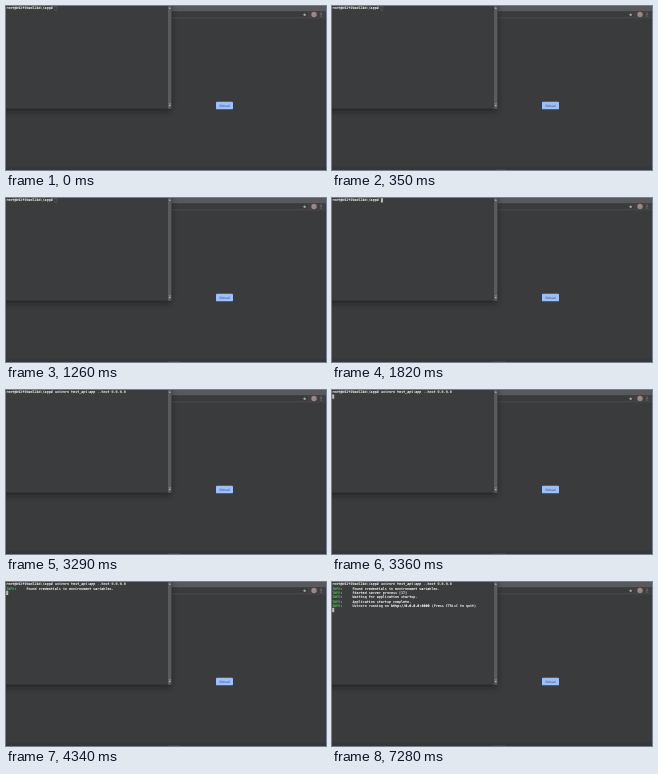
Recreate the animation shown at these times as an HTML page. Size 320x164 px, loop 8 s.

```html
<!DOCTYPE html>
<html lang="en">
<head>
<meta charset="utf-8">
<title>Server start</title>
<style>
  html, body { margin: 0; width: 100%; height: 100%; overflow: hidden; background: #3a3b3d; }
  svg { display: block; width: 100vw; height: 100vh; }
  .term text {
    font: 3.37px "DejaVu Sans Mono", "Liberation Mono", monospace;
    fill: #f4f4f4; stroke: #f4f4f4; stroke-width: .12;
    white-space: pre; text-rendering: geometricPrecision;
  }
  .term .tag { fill: #4cc24c; stroke: #4cc24c; }
  .term .strong { font-weight: bold; fill: #fff; }
  .label { font: 3.3px Roboto, Arial, sans-serif; fill: #3d4f74; text-rendering: geometricPrecision; }
</style>
</head>
<body>
<svg viewBox="0 0 320 164" preserveAspectRatio="none">
  <defs>
    <filter id="blur" x="-10%" y="-10%" width="120%" height="130%"><feGaussianBlur stdDeviation="3.4"/></filter>
  </defs>

  <!-- browser window -->
  <rect width="320" height="164" fill="#3a3b3d"/>
  <rect width="320" height="5.3" fill="#58595b"/>
  <rect y="5.3" width="320" height="6.5" fill="#3f4042"/>
  <rect x="120" y="6" width="182" height="5" rx="2.5" fill="#3a3b3d"/>
  <rect y="11.6" width="320" height=".7" fill="#4c4d4f"/>
  <path d="M298.7 7l.5 1.1 1.2.2-.9.8.2 1.2-1-.6-1.1.6.2-1.2-.9-.8 1.2-.2z" fill="#a0a1a3"/>
  <circle cx="308" cy="8.5" r="2.7" fill="#a08680"/>
  <g fill="#98999b">
    <circle cx="315" cy="6.9" r=".5"/><circle cx="315" cy="8.5" r=".5"/><circle cx="315" cy="10.1" r=".5"/>
  </g>
  <rect y="160.6" width="320" height="3.4" fill="#363739"/>
  <rect id="dock" x="161" y="163" width="13" height="1" fill="#434446"/>
  <rect x="210" y="95.7" width="17" height="7.6" rx=".9" fill="#9dc0fa"/>
  <text class="label" x="218.5" y="100.7" text-anchor="middle">Reload</text>

  <!-- terminal window -->
  <rect x="-12" y="-8" width="177" height="113" fill="#000" opacity=".42" filter="url(#blur)"/>
  <rect width="165.4" height="102.6" fill="#3b3c3e"/>
  <rect x="162" width="3.4" height="102.6" fill="#5a5b5d"/>
  <path d="M162.8 2.8l1-1.6 1 1.6zM162.8 99l1 1.6 1-1.6z" fill="#c4c5c6"/>
  <rect x="162.6" y="97.5" width="2.4" height=".8" fill="#929395"/>
  <g class="term">
    <g id="lines"></g>
    <rect id="cursor" width="2" height="4.3"/>
  </g>
</svg>
<script>
  const LOOP = 8000, CHAR = 2.03, ROW = 4.28;
  const FOCUS = 1820, PASTE = 2520, ENTER = 3290, NEWLINE = 3360, FOUND = 4340, READY = 7280;
  const prompt = "root@b92f99ad124d:/app# ";
  const command = "uvicorn test_api:app --host 0.0.0.0";
  const find = id => document.getElementById(id);
  const cursor = find("cursor"), dock = find("dock");

  function addText(row, col, str, cls = "") {
    const el = document.createElementNS("http://www.w3.org/2000/svg", "text");
    el.setAttribute("x", col * CHAR + 0.2);
    el.setAttribute("y", row * ROW + 3.4);
    el.setAttribute("class", cls);
    el.textContent = str;
    find("lines").append(el);
    return el;
  }

  const parts = [];
  const add = (from, ...args) => parts.push({ from, el: addText(...args) });

  function addInfo(from, row, message) {
    add(from, row, 0, "INFO", "tag");
    add(from, row, 4, ":");
    add(from, row, 10, message);
  }

  add(0, 0, 0, prompt);
  add(PASTE, 0, prompt.length, command);
  addInfo(FOUND, 1, "Found credentials in environment variables.");
  addInfo(READY, 2, "Started server process [17]");
  addInfo(READY, 3, "Waiting for application startup.");
  addInfo(READY, 4, "Application startup complete.");
  addInfo(READY, 5, "Uvicorn running on ");
  add(READY, 5, 29, "http://0.0.0.0:8000", "strong");
  add(READY, 5, 48, " (Press CTRL+C to quit)");

  function show(el, on) {
    el.setAttribute("visibility", on ? "visible" : "hidden");
  }

  function placeCursor(t) {
    const row = t >= READY ? 6 : t >= FOUND ? 2 : t >= NEWLINE ? 1 : 0;
    const col = row ? 0 : prompt.length + (t >= PASTE ? command.length : 0);
    const focused = t >= FOCUS;
    cursor.setAttribute("x", col * CHAR + 0.2);
    cursor.setAttribute("y", row * ROW + 0.2);
    cursor.setAttribute("fill", focused ? "#b9c2b9" : "none");
    cursor.setAttribute("stroke", focused ? "none" : "#77787a");
    cursor.setAttribute("stroke-width", 0.3);
    show(cursor, t < ENTER || t >= NEWLINE);
  }

  function draw(t) {
    for (const p of parts) show(p.el, t >= p.from);
    placeCursor(t);
    show(dock, t >= 350);
    dock.setAttribute("x", t >= 1260 ? 161 : 163);
    dock.setAttribute("width", t >= 1260 ? 13 : 11);
  }

  const start = performance.now();
  function tick() {
    draw((performance.now() - start) % LOOP);
    requestAnimationFrame(tick);
  }
  tick();
</script>
</body>
</html>
```
